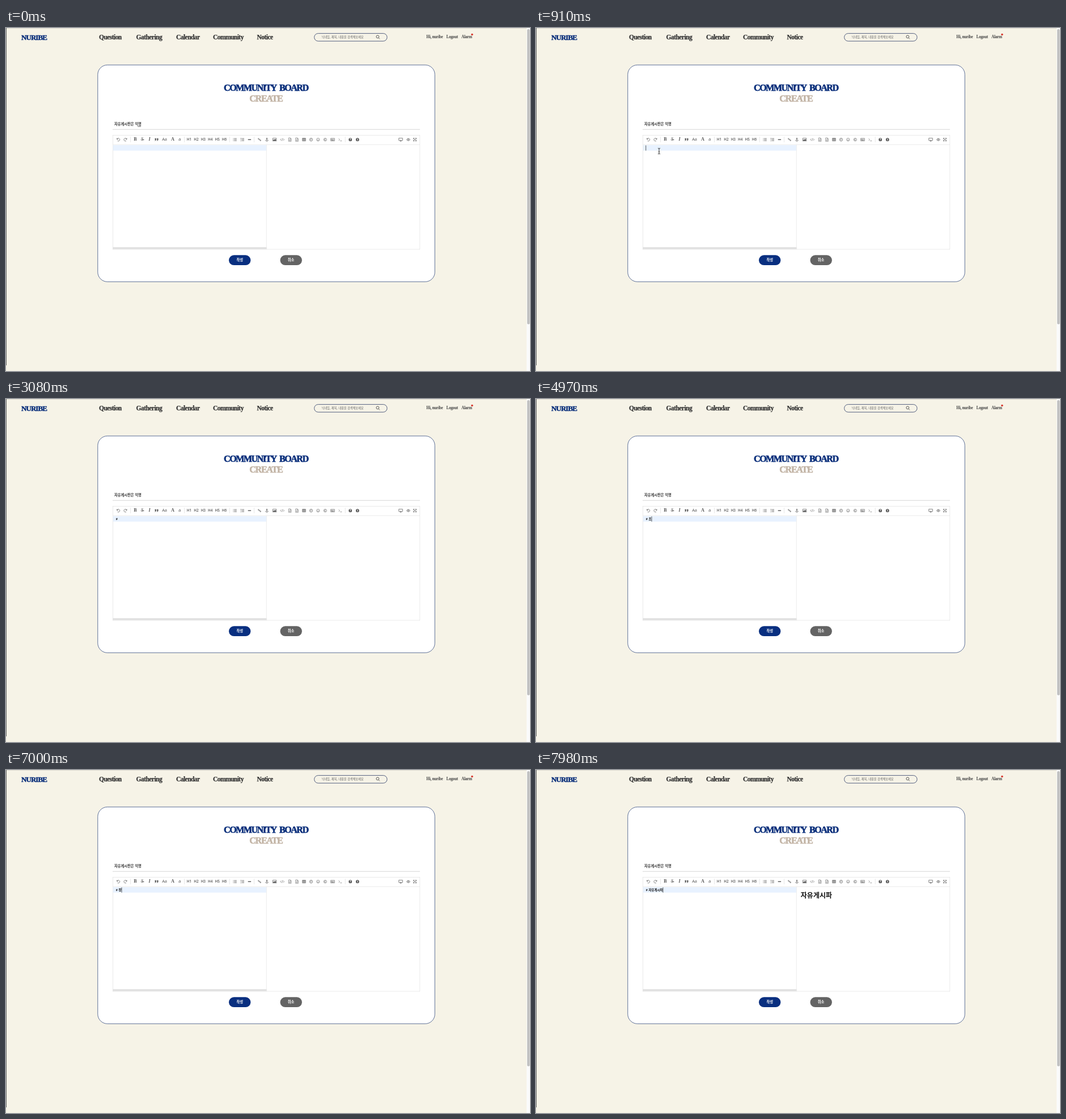
An HTML page for the animation above (8 s loop, 924 by 606 pixels).

```html
<!DOCTYPE html>
<html lang="ko">
<head>
<meta charset="utf-8">
<style>
  html, body { margin: 0; width: 100%; height: 100%; overflow: hidden; background: #f6f3e7; }
  svg { display: block; }
  text { font-family: "Noto Sans CJK KR", "Noto Sans CJK", "Noto Sans", sans-serif; white-space: pre; }
  .slab { font-family: "Liberation Serif", serif; font-weight: bold; stroke: currentColor; stroke-width: .25px; }
  .logo { font-size: 13px; letter-spacing: -.95px; stroke-width: .45px; fill: #0a2f7b; color: #0a2f7b; }
  .nav { font-size: 11.5px; letter-spacing: -.55px; fill: #333; color: #333; }
  .user { font-size: 7.2px; letter-spacing: -.25px; fill: #444; stroke: none; }
  .title { font-size: 16.2px; letter-spacing: -1.6px; word-spacing: 3.5px; stroke-width: .6px; text-anchor: middle; }
  .navy { fill: #0a2f7b; color: #0a2f7b; }
  .tan { fill: #c3b5a6; color: #c3b5a6; letter-spacing: -1.35px; }
  .button { font-size: 6.3px; font-weight: bold; fill: #fff; text-anchor: middle; }
  .tool { font-size: 6.3px; fill: #555; text-anchor: middle; font-family: "Open Sans", sans-serif; font-weight: 600; }
  .tool.serif { font-family: "Liberation Serif", serif; font-size: 8.2px; font-weight: bold; }
  .line { fill: none; stroke: #666; stroke-width: .8; stroke-linejoin: round; }
  .solid { fill: #555; fill-rule: evenodd; }
</style>
</head>
<body>
<svg width="924" height="606" viewBox="0 0 924 606">
  <rect width="924" height="606" fill="#f6f3e7"/>
  <rect width="918" height=".6" fill="#cfcdc4"/>
  <rect width="1" height="596" fill="#666"/>
  <rect x="918" width="6" height="606" fill="#fafafa"/>
  <rect x="919" y="2" width="4.6" height="521.5" rx="2.2" fill="#c1c1c1"/>

  <text class="slab logo" x="27" y="21">NURIBE</text>
  <g id="nav"></g>
  <rect x="543.6" y="9.6" width="128.4" height="13.6" rx="6.8" fill="none" stroke="#2c3c66" stroke-width=".8"/>
  <text x="556.5" y="18.2" font-size="5.2" fill="#666">닉네임, 제목, 내용을 검색해보세요</text>
  <path d="M657 17.4l2 2M657.7 15.4a2.4 2.4 0 1 1-4.8 0a2.4 2.4 0 1 1 4.8 0" fill="none" stroke="#333" stroke-width=".8"/>
  <circle cx="821.9" cy="11.5" r="1.8" fill="#d8392f"/>

  <rect x="161.8" y="65.3" width="594.4" height="383" rx="17" fill="#fff" stroke="#2a4277" stroke-width=".75"/>
  <text class="slab title navy" x="458.3" y="111.4">COMMUNITY BOARD</text>
  <text class="slab title tan" x="458.3" y="130">CREATE</text>
  <text x="191" y="172.4" font-size="6.25" font-weight="bold" fill="#333">자유게시판은 익명</text>
  <path id="composing" d="M232.3 174h5.8" stroke="#222" stroke-width=".7"/>
  <path d="M188 179.2h542" stroke="#c4c4c4" stroke-width=".7"/>

  <rect x="188.4" y="189.6" width="541.4" height="201.4" fill="#fff" stroke="#ddd" stroke-width=".6"/>
  <path d="M188.4 206h541.4M459.3 206v185" stroke="#ddd" stroke-width=".6"/>
  <rect x="188.7" y="207" width="270.3" height="9.6" fill="#e8f2ff"/>
  <rect x="188.4" y="387.2" width="271" height="3.6" fill="#e1e1e1"/>
  <g id="toolbar"></g>

  <rect x="393" y="401.3" width="38.4" height="17.8" rx="8.9" fill="#092f80"/>
  <text class="button" x="412.2" y="411.7">작성</text>
  <rect x="483.5" y="401.3" width="38.4" height="17.8" rx="8.9" fill="#646464"/>
  <text class="button" x="502.6" y="411.7">취소</text>

  <g font-weight="bold" fill="#111">
    <text id="hash" x="193.7" y="213.5" font-size="5.4">#</text>
    <text id="typed" x="198.5" y="213.5" font-size="5.45"></text>
    <text id="preview" x="466.8" y="225.6" font-size="12"></text>
  </g>
  <text id="previewHash" x="467" y="220.2" font-size="5.6" fill="#333">#</text>
  <rect id="caret" y="207.4" width=".8" height="9.2" fill="#333"/>
  <path id="ibeam" d="M-2-5.2Q0-5 0-4V4Q0 5-2 5.2M2-5.2Q0-5 0-4M0 4Q0 5 2 5.2M-1 1.2H1" fill="none" stroke="#222" stroke-width=".9"/>
  <path id="arrow" d="M0-5V4l2-1.8 1.4 3.3 1.4-.6-1.4-3.2h2.8z" fill="#111" stroke="#fff" stroke-width=".6"/>
</svg>

<script>
const el = id => document.getElementById(id);
const add = (parent, tag, attrs, content = "") => {
  const node = document.createElementNS("http://www.w3.org/2000/svg", tag);
  for (const key in attrs) node.setAttribute(key, attrs[key]);
  node.textContent = content;
  parent.append(node);
  return node;
};

[["Question", 164], ["Gathering", 229.6], ["Calendar", 300], ["Community", 365], ["Notice", 442.5]]
  .forEach(([label, x]) => add(el("nav"), "text", { class: "slab nav", x, y: 19.7 }, label));
[["Hi, nuribe", 741.3], ["Logout", 776.4], ["Alarm", 803]]
  .forEach(([label, x]) => add(el("nav"), "text", { class: "slab user", x, y: 18.2 }, label));

const toolbar = el("toolbar");
const label = (content, x, kind = "", extra = {}) =>
  add(toolbar, "text", { class: "tool " + kind, x, y: 199.3, ...extra }, content);
const icon = (x, d, kind = "line") =>
  add(toolbar, "path", { class: kind, d, transform: `translate(${x} 197.2)` });
const thinIcon = (x, d) => { icon(x, d).style.strokeWidth = .65; };
const disc = r => `M${r} 0A${r} ${r} 0 1 1-${r} 0A${r} ${r} 0 1 1 ${r} 0`;

for (const x of [219.6, 314.5, 394.2, 437.6, 598.2])
  add(toolbar, "path", { d: `M${x} 192v10`, stroke: "#ddd", "stroke-width": .7 });

icon(198, "M-2.4-2.7V-.6H-.3M-2.2-.8A2.5 2.5 0 1 1-1.4 2");
icon(210.6, "M2.4-2.7V-.6H.3M2.2-.8A2.5 2.5 0 1 0 1.4 2");
label("B", 228, "serif");
label("S", 240.6, "serif", { style: "font-weight:normal" });
icon(240.6, "M-3 .2H3");
label("I", 253, "serif", { "font-style": "italic" });
icon(265.5, "M-3-2.3h2.4v2.4q0 2-2.4 2.4v-1q1-.2 1.1-1.2h-1.1zM.6-2.3h2.4v2.4q0 2-2.4 2.4v-1q1-.2 1.1-1.2h-1.1z", "solid");
label("Aa", 279.6, "", { style: "font-size:7.5px;font-weight:400" });
label("A", 294, "serif");
label("a", 306.2, "", { style: "font-size:8px;font-weight:400" });
for (let n = 1; n <= 6; n++) label("H" + n, 310.6 + 12.4 * n);

icon(403.6, "M-1.4-2H3.2M-1.4 0H3.2M-1.4 2H3.2M-3.2-2h1M-3.2 0h1M-3.2 2h1");
icon(416.8, "M-1.2-2H3.2M-1.2 0H3.2M-1.2 2H3.2M-2.6-3v1.8M-3.2 0h1.2M-3.2 2.4h1.2");
icon(429.4, "M-2.7-.7H2.7V.7H-2.7z", "solid");
icon(447, "M-.3-.3L-1.9-1.9M.3.3L1.9 1.9M-.6-1.5L-1.6-2.5-2.6-1.5-.9.3 0-.3M.6 1.5L1.6 2.5 2.6 1.5.9-.3 0 .3");
icon(460, "M0-1.4V2.7M-1.4-.6H1.4M-2.8.8Q-2.2 2.6 0 2.7Q2.2 2.6 2.8.8M.8-2.2a.8.8 0 1 1-1.6 0a.8.8 0 1 1 1.6 0");
icon(473.6, "M-3.2-2.5H3.2V2.5H-3.2z");
icon(473.6, "M-2.5 1.8V.7L-1.2-.5-.4.3 1.2-1.3 2.5 0V1.8z", "solid");
thinIcon(487.2, "M-1.8-1.7L-3.3 0-1.8 1.7M1.8-1.7L3.3 0 1.8 1.7M.6-2.4L-.6 2.4");
for (const x of [500.6, 513])
  thinIcon(x, "M-2.3-3H.8L2.3-1.5V3H-2.3zM.6-3V-1.3H2.3M-1.2.2H1.2M-1.2 1.6H1.2");
icon(525.5, "M-2.8-2.4H2.8V2.4H-2.8zM-2.8-1.8H2.8M-2.8.4H2.8M-1-2V2.4M1-2V2.4");
icon(538, disc(2.6) + "M0-1.5V.2H-1.1");
thinIcon(550.3, disc(2.6) + "M-1.4.7Q0 2.1 1.4.7M-1-1.1v.6M1-1.1v.6");
thinIcon(562.9, disc(2.6) + "M1.1-.7A1.3 1.3 0 1 0 1.1.7");
thinIcon(576, "M-3.4-2.3H3.4V2.3H-3.4zM-2.2-1H-.4V.7H-2.2zM.6-1H2.4M.6.2H2.4M-2.2 1.4H2.4");
thinIcon(589.5, "M-2.8-1.9L-1 0-2.8 1.9M-.2 2.2H2.8");
for (const [x, mark] of [[607.2, "?"], [619.8, "i"]]) {
  icon(x, disc(2.9), "solid");
  label(mark, x, "", { style: "font-size:5px;font-weight:800;fill:#fff", y: 199.1 });
}
icon(696, "M-3.3-2.6H3.3V1.4H-3.3zM0 1.4V2.8M-1.6 2.8H1.6");
icon(709.4, "M-3.2 0Q0-4 3.2 0Q0 4-3.2 0" + disc(1));
icon(721, "M-2-2L2 2M2-2L-2 2M-2.6-.7V-2.6H-.7M.7-2.6H2.6V-.7M2.6.7V2.6H.7M-.7 2.6H-2.6V.7");

// Each row: time in ms, then the state that holds from there on.
const text = [[0, ""], [1960, "#"], [2520, "# "], [4830, "# ㅈ"], [4970, "# 조"], [5530, "# ㅈ"], [5670, "# "],
  [6720, "# ㅈ"], [6790, "# 자"], [7000, "# 장"], [7070, "# 자유"], [7280, "# 자육"], [7420, "# 자유게"],
  [7630, "# 자유게시"], [7840, "# 자유게싶"], [7910, "# 자유게시파"]];
const preview = [[0, ""], [2240, "#"], [2800, ""], [5180, "조"], [5810, ""], [7140, "자유"], [7350, "자육"],
  [7700, "자유게시"], [7980, "자유게시파"]];
const caretOn = [[0, 0], [840, 1], [1400, 0], [1890, 1], [3080, 0], [3570, 1], [4130, 0], [4690, 1],
  [5390, 0], [5670, 1], [6230, 0], [6720, 1]];
const pointerPath = [[140, 359, 172], [350, 262, 196], [560, 130, 221], [700, 178, 222], [840, 214, 218],
  [910, 217, 217.5], [980, 220, 216], [1050, 222.6, 215.2], [1960, 222.6, 215.2]];

const at = (rows, t) => rows.findLast(row => row[0] <= t)[1];
const show = (node, on) => node.setAttribute("visibility", on ? "visible" : "hidden");

function pointerAt(t) {
  const i = pointerPath.findIndex(point => point[0] > t);
  if (i < 1) return null;
  const [t0, x0, y0] = pointerPath[i - 1], [t1, x1, y1] = pointerPath[i];
  const k = (t - t0) / (t1 - t0);
  return [x0 + (x1 - x0) * k, y0 + (y1 - y0) * k];
}

function draw(t) {
  const line = at(text, t), chars = line.slice(2), rendered = at(preview, t);
  show(el("hash"), line);
  el("typed").textContent = chars;
  show(el("previewHash"), rendered === "#");
  el("preview").textContent = rendered === "#" ? "" : rendered;
  show(el("composing"), t < 840);

  const caretX = line.length < 2 ? [193.4, 197][line.length] : 198.6 + 5 * chars.length;
  el("caret").setAttribute("x", caretX);
  show(el("caret"), at(caretOn, t));

  const pointer = pointerAt(Math.floor(t / 70) * 70);
  const overText = pointer && (pointer[1] < 180 || (pointer[0] > 188 && pointer[1] > 206));
  show(el("ibeam"), pointer && overText);
  show(el("arrow"), pointer && !overText);
  if (pointer)
    for (const id of ["ibeam", "arrow"]) el(id).setAttribute("transform", `translate(${pointer})`);
}

const start = performance.now();
function tick() {
  draw((performance.now() - start) % 8000);
  requestAnimationFrame(tick);
}
tick();
</script>
</body>
</html>
```
